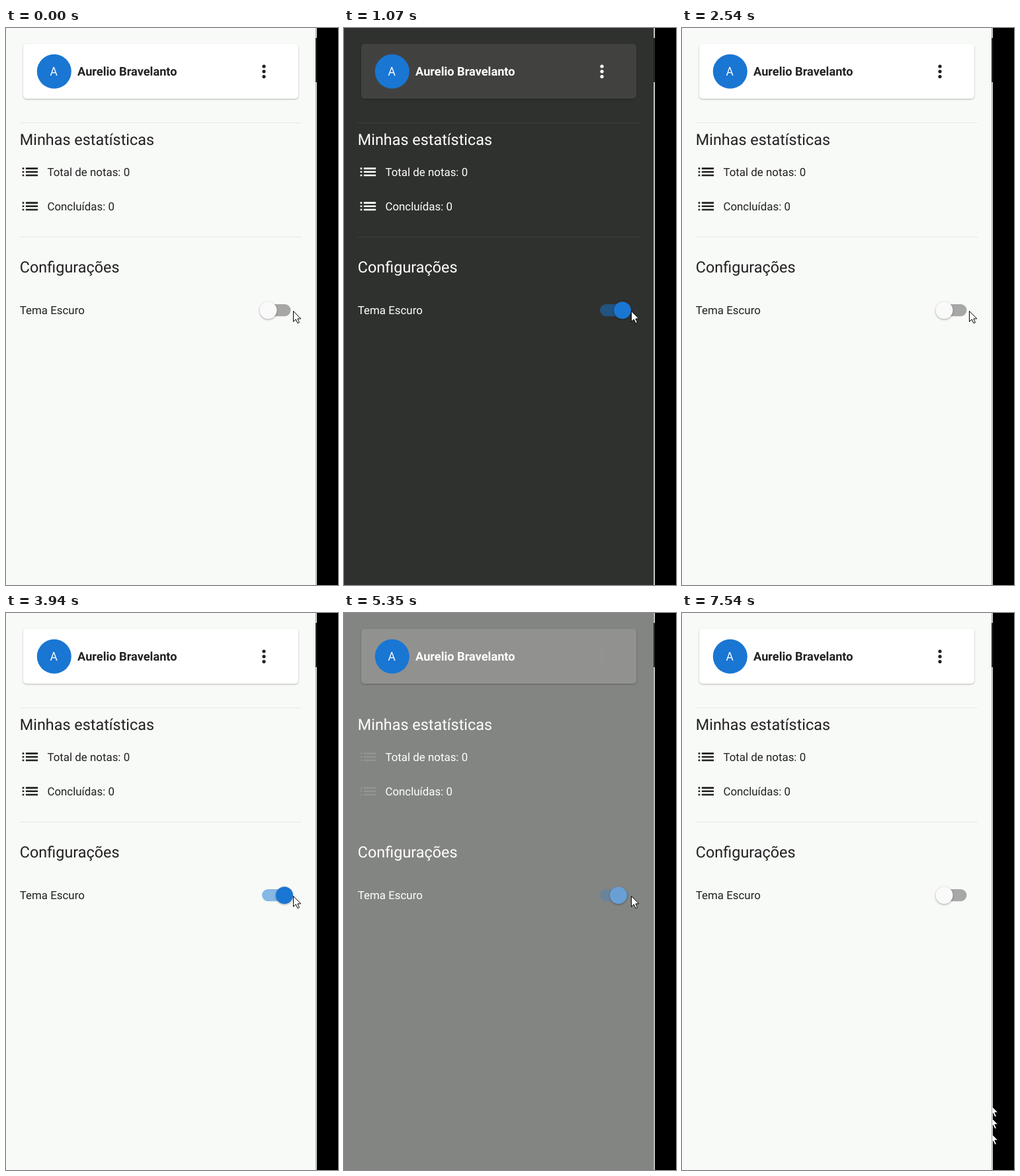
Write an HTML page that moves like this. It is 502 px wide and 843 px high and loops after 7610 ms.

```html
<!DOCTYPE html>
<html lang="pt">
<head>
<meta charset="utf-8">
<title>Tema escuro</title>
<style>
/* 1 = dark surfaces, light ink, switch on */
@property --dark { syntax: "<number>"; inherits: true; initial-value: 0; }
@property --ink { syntax: "<number>"; inherits: true; initial-value: 0; }
@property --on { syntax: "<number>"; inherits: true; initial-value: 0; }

html, body { margin: 0; width: 100%; height: 100%; overflow: hidden; background: #000; }
#stage {
  display: block; width: 502px; height: 843px;
  font-family: Roboto, sans-serif;
  animation: dark 7610ms infinite, ink 7610ms infinite, on 7610ms infinite;
  animation-timing-function: linear;
}
.page { fill: rgb(calc(248 - 201 * var(--dark)) calc(250 - 201 * var(--dark)) calc(247 - 201 * var(--dark))); }
.card {
  fill: rgb(calc(255 - 190 * var(--dark)) calc(255 - 189 * var(--dark)) calc(255 - 191 * var(--dark)));
  filter: drop-shadow(0 1px 1px rgba(0, 0, 0, .28));
}
.rule { --v: calc(255 * var(--dark)); fill: rgb(var(--v) var(--v) var(--v) / .07); }
.icon {
  --v: calc(255 * var(--dark));
  fill: rgb(var(--v) var(--v) var(--v) / calc(.87 + .13 * var(--dark)));
}
.label {
  --v: calc(255 * var(--ink));
  fill: rgb(var(--v) var(--v) var(--v) / calc(.87 + .13 * var(--ink)));
  font-size: 16.9px;
  text-rendering: geometricPrecision;
}
.title { font-size: 23.4px; }
.name { font-size: 18.2px; font-weight: 700; }
.initial { font-size: 17.5px; fill: #fff; text-anchor: middle; }
.track {
  --v: calc(255 * var(--dark) * (1 - var(--on)));
  fill: rgb(calc(var(--v) + 25 * var(--on)) calc(var(--v) + 118 * var(--on)) calc(var(--v) + 210 * var(--on))
    / calc(.33 + .17 * var(--on)));
}
.thumb {
  --v: calc((250 - 61 * var(--dark)) * (1 - var(--on)));
  fill: rgb(calc(var(--v) + 25 * var(--on)) calc(var(--v) + 118 * var(--on)) calc(var(--v) + 210 * var(--on)));
  transform: translateX(calc(24.5px * var(--on) * (1.7 - .7 * var(--on))));
  filter: drop-shadow(0 1.5px 1.5px rgba(0, 0, 0, .35));
}
.pointer { animation: pointer 7610ms infinite; }
.trail { animation: trail 7610ms infinite step-end; }
.t1 { --from: 0; animation-name: trail1; }
.t2 { animation-name: trail2; }
.t3 { animation-name: trail3; }

@keyframes dark {
  0% { --dark: 0; }
  5.256% { --dark: 0; animation-timing-function: steps(3, jump-start); }
  7.884% { --dark: 1; }
  22.904% { --dark: 1; animation-timing-function: steps(4, jump-start); }
  26.426% { --dark: 0; }
  52.694% { --dark: 0; animation-timing-function: steps(3, jump-start); }
  55.322% { --dark: 1; }
  70.3% { --dark: 1; }
  70.301% { --dark: .87; animation-timing-function: steps(3, jump-start); }
  72.97% { --dark: 0; }
  100% { --dark: 0; }
}
@keyframes ink {
  0% { --ink: 0; }
  7.884% { --ink: 0; animation-timing-function: steps(3, jump-start); }
  10.512% { --ink: 1; }
  24.678% { --ink: 1; animation-timing-function: steps(5, jump-start); }
  29.08% { --ink: 0; }
  54.4% { --ink: 0; }
  54.401% { --ink: .18; animation-timing-function: step-end; }
  55.321% { --ink: .18; animation-timing-function: steps(3, jump-start); }
  57.95% { --ink: 1; }
  72.142% { --ink: 1; animation-timing-function: steps(3, jump-start); }
  74.77% { --ink: 0; }
  100% { --ink: 0; }
}
@keyframes on {
  0% { --on: 0; }
  4.336% { --on: 0; animation-timing-function: steps(3, jump-start); }
  6.965% { --on: 1; }
  22.076% { --on: 1; animation-timing-function: steps(3, jump-start); }
  24.704% { --on: 0; }
  51.773% { --on: 0; }
  51.774% { --on: 1; }
  70.3% { --on: 1; }
  70.301% { --on: .87; animation-timing-function: steps(3, jump-start); }
  72.97% { --on: 0; }
  100% { --on: 0; }
}
@keyframes pointer {
  0% { transform: translate(434px, 428px); }
  79.76% { transform: translate(434px, 428px); animation-timing-function: steps(4, jump-start); }
  83.3% { transform: translate(406px, 560px); animation-timing-function: steps(5, jump-start); }
  87.66% { transform: translate(466px, 744px); animation-timing-function: step-end; }
  88.57% { transform: translate(466px, 762px); animation-timing-function: step-end; }
  89.49% { transform: translate(466px, 785px); animation-timing-function: step-end; }
  90.54% { transform: translate(461px, 806px); animation-timing-function: step-end; }
  91.46% { transform: translate(463px, 828px); animation-timing-function: step-end; }
  92.25%, 100% { transform: translate(463px, 870px); }
}
@keyframes trail1 { 0% { opacity: 0; } 87.66%, 100% { opacity: 1; } }
@keyframes trail2 { 0% { opacity: 0; } 88.57%, 100% { opacity: 1; } }
@keyframes trail3 { 0% { opacity: 0; } 89.49%, 100% { opacity: 1; } }
</style>
</head>
<body>
<svg id="stage" viewBox="0 0 502 843">
  <defs>
    <path id="arrow" d="M.5 .5V16.5L4.3 13 7 18.8 9.5 17.7 6.9 12H11.8Z" fill="#fff" stroke="#000"/>
    <path id="list" d="M3 7h2v2H3zM3 11h2v2H3zM3 15h2v2H3zM7 7h14v2H7zM7 11h14v2H7zM7 15h14v2H7z"/>
    <clipPath id="screen"><path d="M0 0H477V843H0z"/></clipPath>
    <clipPath id="margin"><path d="M470 0H477V843H470z"/></clipPath>
  </defs>

  <rect width="502" height="843"/>
  <rect class="page" width="468" height="843"/>

  <rect class="card" x="26" y="24" width="416" height="83" rx="5"/>
  <circle cx="72.8" cy="65.8" r="26" fill="#1976d2"/>
  <text class="initial" x="72.3" y="72">A</text>
  <text class="label name" x="108" y="72">Aurelio Bravelanto</text>
  <g class="icon">
    <circle cx="390" cy="58" r="2.6"/>
    <circle cx="390" cy="65.8" r="2.6"/>
    <circle cx="390" cy="73.6" r="2.6"/>
  </g>

  <rect class="rule" x="21" y="143" width="426" height="1"/>
  <text class="label title" x="20.8" y="177">Minhas estatísticas</text>
  <use class="icon" href="#list" transform="translate(20.8 202.2) scale(1.3)"/>
  <text class="label" x="62.4" y="224">Total de notas: 0</text>
  <use class="icon" href="#list" transform="translate(20.8 254.2) scale(1.3)"/>
  <text class="label" x="62.4" y="276">Concluídas: 0</text>

  <rect class="rule" x="21" y="316" width="426" height="1"/>
  <text class="label title" x="20.8" y="370">Configurações</text>
  <text class="label" x="20.8" y="433">Tema Escuro</text>
  <rect class="track" x="387" y="418" width="43.5" height="18.2" rx="9.1"/>
  <circle class="thumb" cx="396.5" cy="427.2" r="13"/>

  <!-- window edge with scroll handle -->
  <rect x="468" width="1" height="843" fill="#a0a0a0"/>
  <rect x="469" width="1" height="843" fill="#f0f0f0"/>
  <rect x="468" y="15" width="1" height="67" fill="#1c1c1c"/>
  <rect x="469" y="15" width="1" height="67" fill="#333"/>

  <g clip-path="url(#margin)">
    <g class="trail t1"><use href="#arrow" x="466" y="744"/></g>
    <g class="trail t2"><use href="#arrow" x="466" y="762"/></g>
    <g class="trail t3"><use href="#arrow" x="466" y="786"/></g>
  </g>
  <g clip-path="url(#screen)">
    <g class="pointer"><use href="#arrow"/></g>
  </g>
</svg>
</body>
</html>
```
